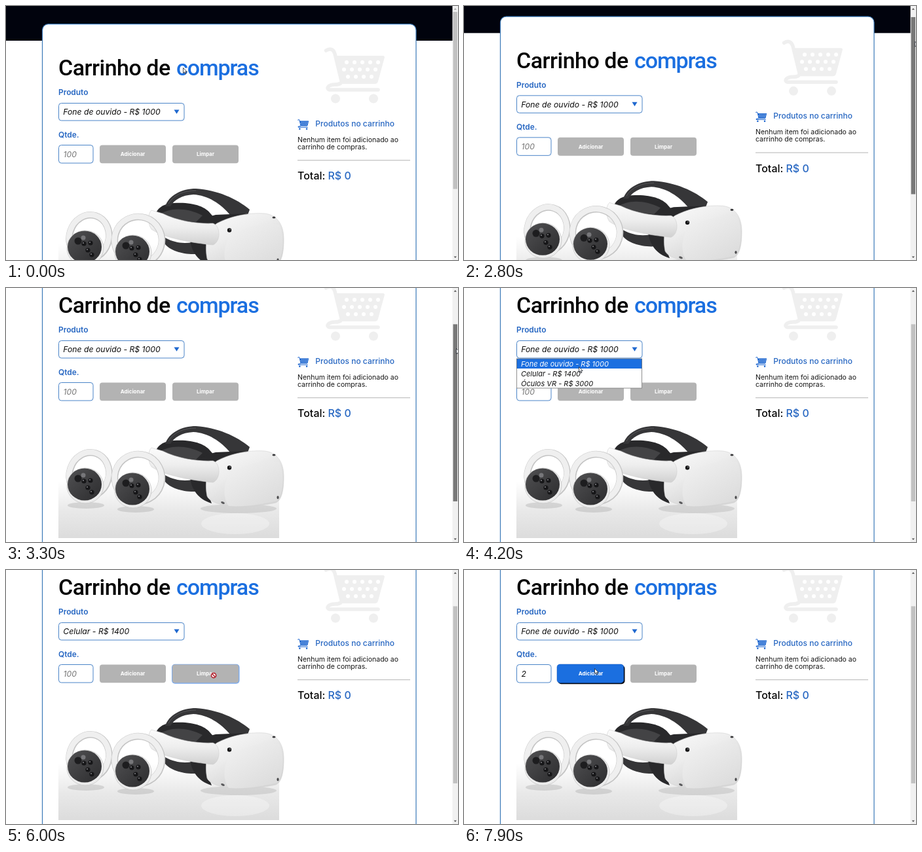
Write an HTML page with a canvas that moves like this. It is 690 by 388 pixels and loops after 8000 ms.

```html
<!DOCTYPE html>
<html lang="pt-BR">
<head>
<meta charset="utf-8">
<title>Carrinho de compras</title>
<style>
html, body { margin: 0; width: 100%; height: 100%; overflow: hidden; background: #fff; }
canvas { display: block; width: 690px; height: 388px; }
</style>
</head>
<body>
<canvas id="stage"></canvas>
<script>
const W = 690, H = 388, LOOP = 8000, STEP = 100;
const BLUE = '#1b6fe0', LABEL = '#2767c2', GREY = '#b3b3b3', EDGE = '#4a84c8';
const canvas = document.getElementById('stage');
const ratio = window.devicePixelRatio || 1;
canvas.width = W * ratio;
canvas.height = H * ratio;
const c = canvas.getContext('2d');

// [time, x, y] of the mouse tip
const mousePath = [
  [0, 270, 94], [2000, 270, 94], [2100, 321, 110], [2200, 349, 66], [2300, 349, 66],
  [2400, 558, 1], [2500, 558, 1], [2600, 688, 46], [2700, 688, 46], [3000, 688, 69],
  [3300, 687, 92], [3400, 590, 104], [3800, 262, 95], [4000, 225, 100], [4300, 150, 130],
  [4600, 122, 155], [4900, 123, 154], [5100, 162, 153], [5300, 166, 154],
  [5800, 317, 161], [6200, 317, 161], [6600, 240, 96], [6900, 240, 96],
  [7200, 170, 115], [7400, 108, 156], [7600, 108, 156], [7900, 199, 150], [8000, 199, 150]
];
const scrollPath = [[0, 0], [2700, 0], [3000, 35], [3300, 68], [8000, 68]];

function along(path, t) {
  let i = 1;
  while (i < path.length - 1 && path[i][0] < t) i++;
  const a = path[i - 1], b = path[i];
  const k = Math.min(1, (t - a[0]) / (b[0] - a[0]));
  return a.slice(1).map((v, n) => v + (b[n + 1] - v) * k);
}

const within = (t, from, to) => t >= from && t < to;

function stateAt(t) {
  const [x, y] = along(mousePath, t);
  return {
    x, y,
    scroll: along(scrollPath, t)[0],
    dragging: within(t, 2600, 3400),
    open: within(t, 3900, 4400) || within(t, 6700, 7200),
    phone: within(t, 4400, 7200),
    typed: within(t, 4800, 5300) || t >= 7600,
    focus: within(t, 4600, 5300) || within(t, 7400, 7900),
    inCart: within(t, 5300, 6000),
    clearFocus: within(t, 6000, 6700)
  };
}

function text(s, x, y, font, color, align = 'left', spacing = 0) {
  c.font = font;
  c.fillStyle = color;
  c.textAlign = align;
  c.letterSpacing = spacing + 'px';
  c.fillText(s, x, y);
}

function box(x, y, w, h, r, fill, line, width = 1) {
  c.beginPath();
  c.roundRect(x, y, w, h, r);
  if (fill) { c.fillStyle = fill; c.fill(); }
  if (line) { c.strokeStyle = line; c.lineWidth = width; c.stroke(); }
}

function shape(d, fill, line, width = 1) {
  const p = new Path2D(d);
  if (fill) { c.fillStyle = fill; c.fill(p); }
  if (line) { c.strokeStyle = line; c.lineWidth = width; c.stroke(p); }
}

function oval(x, y, rx, ry, fill, line, width = 1, turn = 0) {
  c.beginPath();
  c.ellipse(x, y, rx, ry, turn, 0, 7);
  if (fill) { c.fillStyle = fill; c.fill(); }
  if (line) { c.strokeStyle = line; c.lineWidth = width; c.stroke(); }
}

const dot = (x, y, r, fill) => oval(x, y, r, r, fill);

function fade(x0, y0, x1, y1, ...stops) {
  const g = c.createLinearGradient(x0, y0, x1, y1);
  stops.forEach((s, i) => g.addColorStop(i / (stops.length - 1), s));
  return g;
}

function cart(x, y, scale, color) {
  c.save();
  c.translate(x, y);
  c.scale(scale, scale);
  c.lineCap = c.lineJoin = 'round';
  shape('M3.5 6 C10 2 15 4 17 11 L27 52 C28 56 24 58 17 58 C6 58 3 65 9 66 L83 66', null, color, 5.5);
  shape('M20 14 L90 14 Q94 14 92.5 18 L83 53 Q82 57 78 57 L29 57Z', color);
  for (let row = 0; row < 3; row++)
    for (let i = 0; i < 5 - (row > 1); i++)
      dot(35 + i * 12 + (row % 2) * -4 + (row > 1) * 2, 24 + row * 11, 3, '#fff');
  dot(18, 79.5, 7, color);
  dot(76, 79.5, 7, color);
  c.restore();
}

function controller(x, y, rx, ry, fx, fy) {
  oval(x, y, rx, ry, null, '#c4c4c4', 10.5, 0.3);
  oval(x - 0.5, y - 0.5, rx, ry, null, '#efefef', 8.5, 0.3);
  oval(fx + 1, fy + 2, 28, 27, '#ececec', '#c8c8c8', 0.8);
  oval(fx, fy, 26, 24.5, fade(fx - 20, fy - 20, fx + 20, fy + 20, '#4d4d4f', '#303032'));
  dot(fx - 10, fy - 9, 5.5, '#1d1d1f');
  dot(fx - 2, fy - 14, 3.5, '#77777a');
  for (const [dx, dy] of [[-1, -5], [9, -6], [5, 5], [11, 12]]) {
    dot(fx + dx, fy + dy, 3.6, '#161618');
    dot(fx + dx - 1, fy + dy - 1, 1, '#858588');
  }
}

function headset() {
  const dark = '#363638', black = '#29292b';
  c.save();
  c.translate(0, 68);
  c.fillStyle = fade(0, 296, 0, 382, '#ffffff', '#e9e9e9', '#dcdcdc');
  c.fillRect(80, 296, 337, 86);
  oval(355, 337, 58, 7, 'rgba(120,120,120,.2)');
  oval(350, 360, 52, 16, 'rgba(255,255,255,.3)');
  oval(122, 332, 28, 5, 'rgba(130,130,130,.25)');
  oval(198, 338, 28, 5, 'rgba(130,130,130,.25)');

  shape('M228 257 C227 243 238 234 256 233 C284 231 305 238 313 250 L320 258 L314 270 C290 267 255 263 228 257Z', black);
  shape('M234 251 C248 240 275 239 300 252 L290 262 L250 257Z', '#434345');
  shape('M243 238 C249 221 268 211 290 211 C322 213 352 226 372 243 L369 251 L343 252 C328 234 308 221 286 220 C268 221 257 228 251 238Z', dark);
  shape('M248 234 C256 220 272 214 290 214', null, '#555557', 1);
  shape('M243 286 C258 294 270 295 285 293 L290 311 C270 312 250 305 243 296Z', dark);
  shape('M281 289 C279 270 294 257 320 251 L366 249 L335 263 C312 275 302 301 314 329 C294 323 283 308 281 289Z', black);
  shape('M322 264 C340 254 370 247 395 249 C413 251 424 265 424 288 C424 312 420 324 412 328 C392 332 364 336 348 334 C328 332 311 327 307 318 C303 297 306 275 322 264Z',
    fade(305, 250, 345, 335, '#fbfbfb', '#ededed', '#d6d6d6'), '#d0d0d0', 0.6);
  shape('M347 280 C370 268 400 261 417 266 C425 281 425 311 414 325 C395 330 360 335 340 333 C329 319 332 290 347 280Z',
    fade(350, 270, 390, 335, '#efefef', '#e6e6e6', '#dddddd'));
  shape('M222 244 L239 249 C263 261 294 265 316 264 C328 268 328 292 316 297 C285 294 243 287 222 273 C216 264 216 250 222 244Z',
    fade(0, 245, 0, 296, '#fbfbfb', '#eeeeee', '#d2d2d2'), '#cfcfcf', 0.6);
  dot(341, 274.5, 3.2, '#151517');
  dot(342, 273.5, 0.9, '#8d8d8f');
  oval(409, 255, 2.5, 1.6, '#3a3a3c');
  oval(415, 320, 1.6, 2.4, '#4a4a4c');
  oval(331, 328, 3, 1.6, '#5a5a5c', null, 1, 0.4);

  controller(127, 285, 30, 34, 120, 300);
  controller(202, 290, 36, 36, 193, 307);
  c.restore();
}

function button(label, x, active, hover) {
  if (hover) {
    box(x + 0.3, 213.6, 102.2, 28.6, 5, '#05070d');
    box(x - 1, 212, 101.8, 28.4, 4.5, BLUE, '#1454b4', 0.5);
  } else {
    box(x, 212.5, 101, 27.8, 4, active ? BLUE : GREY);
  }
  text(label, x + 50.5, 229.2, '700 8px Inter, sans-serif', '#fff', 'center');
}

function menu(phone, pointerY) {
  const items = ['Fone de ouvido - R$ 1000', 'Celular - R$ 1400', 'Óculos VR - R$ 3000'];
  const top = 176, row = 15;
  let hot = Math.floor((pointerY - top) / row);
  if (hot < 0 || hot > 2) hot = phone ? 1 : 0;
  c.fillStyle = '#fff';
  c.fillRect(80, top, 192, row * 3);
  c.fillStyle = BLUE;
  c.fillRect(80, top + hot * row, 192, row);
  items.forEach((s, i) =>
    text(s, 87, top + i * row + 11.5, 'italic 11px Inter, sans-serif', i === hot ? '#fff' : '#111'));
  c.strokeStyle = '#767676';
  c.lineWidth = 0.8;
  c.strokeRect(80.5, top, 191, row * 3);
}

function form(s) {
  const py = s.y + s.scroll;
  const over = x => s.x >= x && s.x <= x + 101 && py >= 212 && py <= 240;
  const entry = 'italic 12.2px Inter, sans-serif';
  const label = '600 11.9px Inter, sans-serif';
  const title = '500 34px Roboto, sans-serif';

  text('Carrinho de', 80, 106.3, title, '#050505', 'left', -0.5);
  text('compras', 260, 106.3, title, BLUE, 'left', -1.1);
  text('Produto', 80, 136.3, label, LABEL);
  box(80.5, 148.5, 191.5, 26.5, 4, '#fff', EDGE);
  text(s.phone ? 'Celular - R$ 1400' : 'Fone de ouvido - R$ 1000', 87.3, 166.3, entry, '#0c0c0c');
  shape('M256.5 158.5 H264.5 L260.5 164.8Z', '#1f68cf');

  text('Qtde.', 80, 200.5, label, LABEL);
  if (s.focus) box(80.8, 212.8, 51.7, 27, 4, '#fff', '#0b0b0b', 1.4);
  else box(80.5, 212.5, 52.5, 27.5, 4, '#fff', EDGE);
  text(s.typed ? '2' : '100', 87.5, 230.8, entry, s.typed ? '#0c0c0c' : '#757575');
  if (s.focus)
    shape('M121 224.3 L123 221.8 L125 224.3Z M121 228.2 L123 230.7 L125 228.2Z', '#606060');

  button('Adicionar', 143, s.typed, s.typed && over(143));
  if (s.clearFocus) box(253, 211.8, 103.5, 30, 5, '#7eabeb');
  button('Limpar', 254, s.inCart, s.inCart && over(254));
}

function summary(s) {
  const body = '10.5px Inter, sans-serif';
  cart(485, 62, 1, '#efefef');
  cart(445, 173, 0.185, '#1d66cf');
  text('Produtos no carrinho', 472.3, 183.5, '500 12px Inter, sans-serif', LABEL);
  if (s.inCart) {
    text('Celular - 2 x R$ 1400', 445, 208, body, '#161616');
  } else {
    text('Nenhum item foi adicionado ao', 445, 208, body, '#161616');
    text('carrinho de compras.', 445, 219, body, '#161616');
  }
  c.fillStyle = '#b5b5b5';
  c.fillRect(445, 235.2, 172, 1);
  const total = '500 16px Inter, sans-serif';
  text('Total:', 445, 265.3, total, '#080808');
  text(s.inCart ? 'R$ 2800' : 'R$ 0', 491.5, 265.3, total, LABEL);
}

function scrollbar(s) {
  c.fillStyle = '#f1f1f1';
  c.fillRect(681.5, 0, 8.5, H);
  c.fillStyle = s.dragging ? '#787878' : '#c1c1c1';
  c.fillRect(682.5, 9 + s.scroll * 0.682, 6.5, 270.5);
  shape('M683.7 5.8 L685.8 3.2 L687.9 5.8Z', s.scroll ? '#505050' : '#a3a3a3');
  shape('M683.7 382.4 L685.8 385 L687.9 382.4Z', '#505050');
}

function mouse(s) {
  const py = s.y + s.scroll;
  const enabled = s.x < 250 ? s.typed : s.inCart;
  const onButton = (within(s.x, 143, 244) || within(s.x, 254, 355)) && within(py, 212, 240);
  c.save();
  c.translate(s.x, s.y);
  if (onButton && !enabled) {
    oval(0, 0, 3.6, 3.6, '#fff', '#b0202c', 1.6);
    shape('M-2.5 -2.5 L2.5 2.5', null, '#b0202c', 1.5);
  } else {
    c.lineJoin = 'round';
    shape('M0.5 0.5 V8.6 L2.4 6.9 L3.7 9.8 L5 9.2 L3.7 6.4 H6.2Z', '#fff', '#20242c', 0.8);
  }
  c.restore();
}

function draw(now) {
  // the screen updates ten times a second
  const s = stateAt(Math.floor(((now + 5) % LOOP) / STEP) * STEP);
  c.setTransform(ratio, 0, 0, ratio, 0, 0);
  c.fillStyle = '#fff';
  c.fillRect(0, 0, W, H);
  c.save();
  c.translate(0, -s.scroll);
  c.fillStyle = '#01030d';
  c.fillRect(0, 0, 682, 53);
  box(55.5, 27.7, 570.5, 600, 9, '#fff', '#3a79b8', 1.2);
  headset();
  form(s);
  summary(s);
  if (s.open) menu(s.phone, s.y + s.scroll);
  c.restore();
  scrollbar(s);
  mouse(s);
  requestAnimationFrame(draw);
}
requestAnimationFrame(draw);
</script>
</body>
</html>
```
